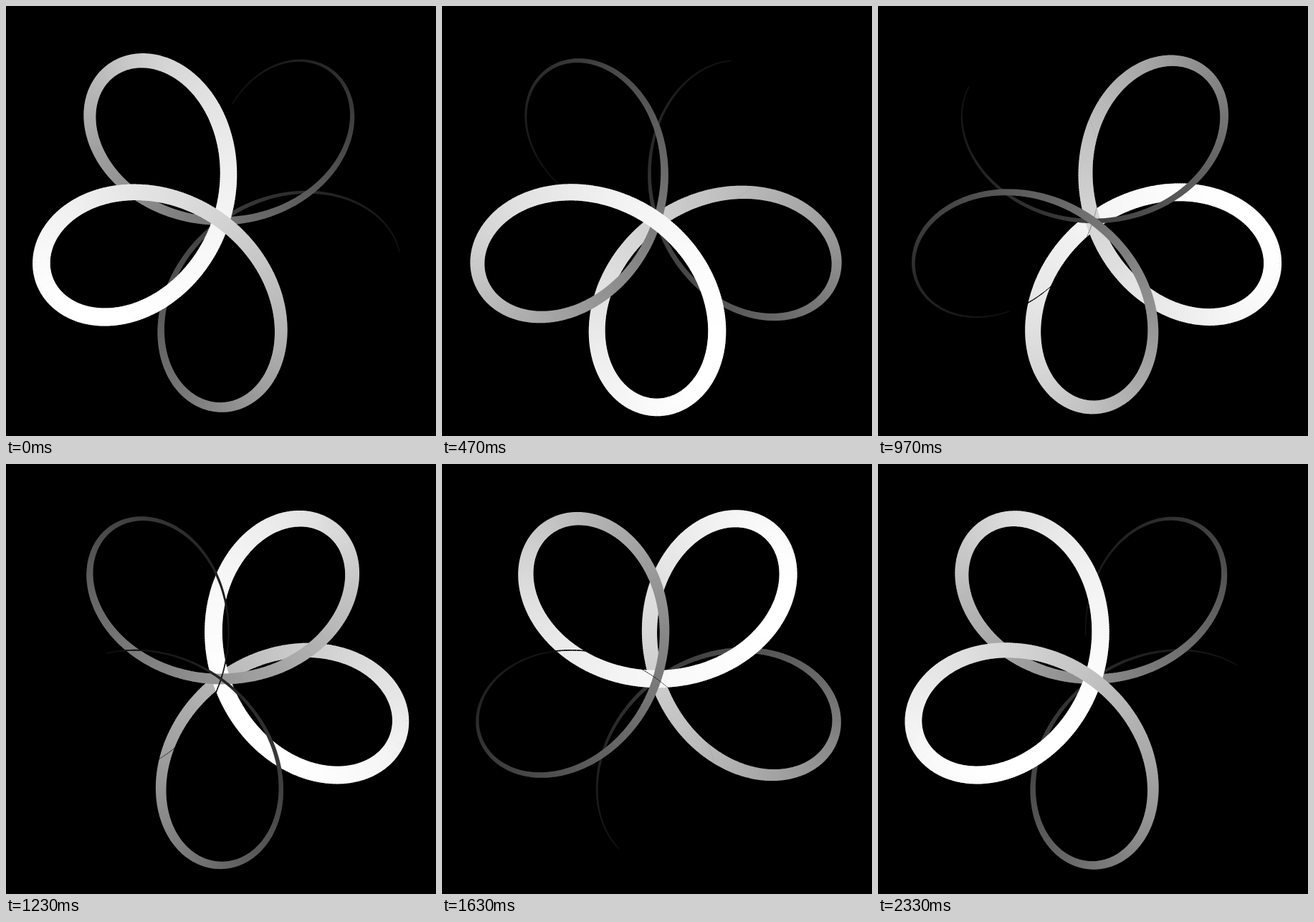
Recreate the animation shown at these times as an HTML page with a canvas. Size 600 by 600 pixels, loop 2360 ms.

```html
<!DOCTYPE html>
<html lang="en">
<head>
<meta charset="utf-8">
<title>Rose ribbon</title>
<style>
  html, body { margin: 0; width: 100%; height: 100%; overflow: hidden; background: #000; }
  canvas { display: block; width: 100vmin; height: 100vmin; }
</style>
</head>
<body>
<canvas id="stage" width="600" height="600"></canvas>
<script>
const ctx = document.getElementById('stage').getContext('2d');
const LOOP = 2360, STEPS = 72;
const PETALS = 5, RADIUS = 260, CENTER = 300, MAX_WIDTH = 25;
const SEGMENTS = 1200, OVERLAP = 0.4;
const DARKEST = 16; // fainter greys fall to black

// Five-petal rose r = cos(5a/3); u counts petals, starting at the bottom tip.
function point(u) {
  const r = RADIUS * Math.cos(Math.PI * u);
  const a = 0.6 * Math.PI * u;
  return [CENTER - r * Math.sin(a), CENTER + r * Math.cos(a)];
}

const segments = Array.from({ length: SEGMENTS }, (_, i) => ({
  turn: (i + 0.5) / SEGMENTS,
  from: point(i * PETALS / SEGMENTS),
  to: point((i + 1 + OVERLAP) * PETALS / SEGMENTS)
}));

function draw(phase) {
  ctx.fillStyle = '#000';
  ctx.fillRect(0, 0, 600, 600);
  for (const { turn, from, to } of segments) {
    const glow = 0.5 + 0.5 * Math.cos(2 * Math.PI * (turn - phase));
    const grey = Math.round(255 * glow);
    const level = grey < DARKEST ? 0 : grey;
    ctx.strokeStyle = `rgb(${level},${level},${level})`;
    ctx.lineWidth = Math.max(0.05, MAX_WIDTH * glow);
    ctx.beginPath();
    ctx.moveTo(...from);
    ctx.lineTo(...to);
    ctx.stroke();
  }
}

// Thirty steps per second, on a 10 ms clock.
const stepAt = ms => Math.floor((Math.floor(ms / 10) * 3 + 1) / 10);

const start = performance.now();
let shown = -1;

function tick() {
  const step = stepAt((performance.now() - start) % LOOP);
  if (step !== shown) {
    shown = step;
    draw(0.75 + (step + 1) / STEPS);
  }
  requestAnimationFrame(tick);
}
tick();
</script>
</body>
</html>
```
